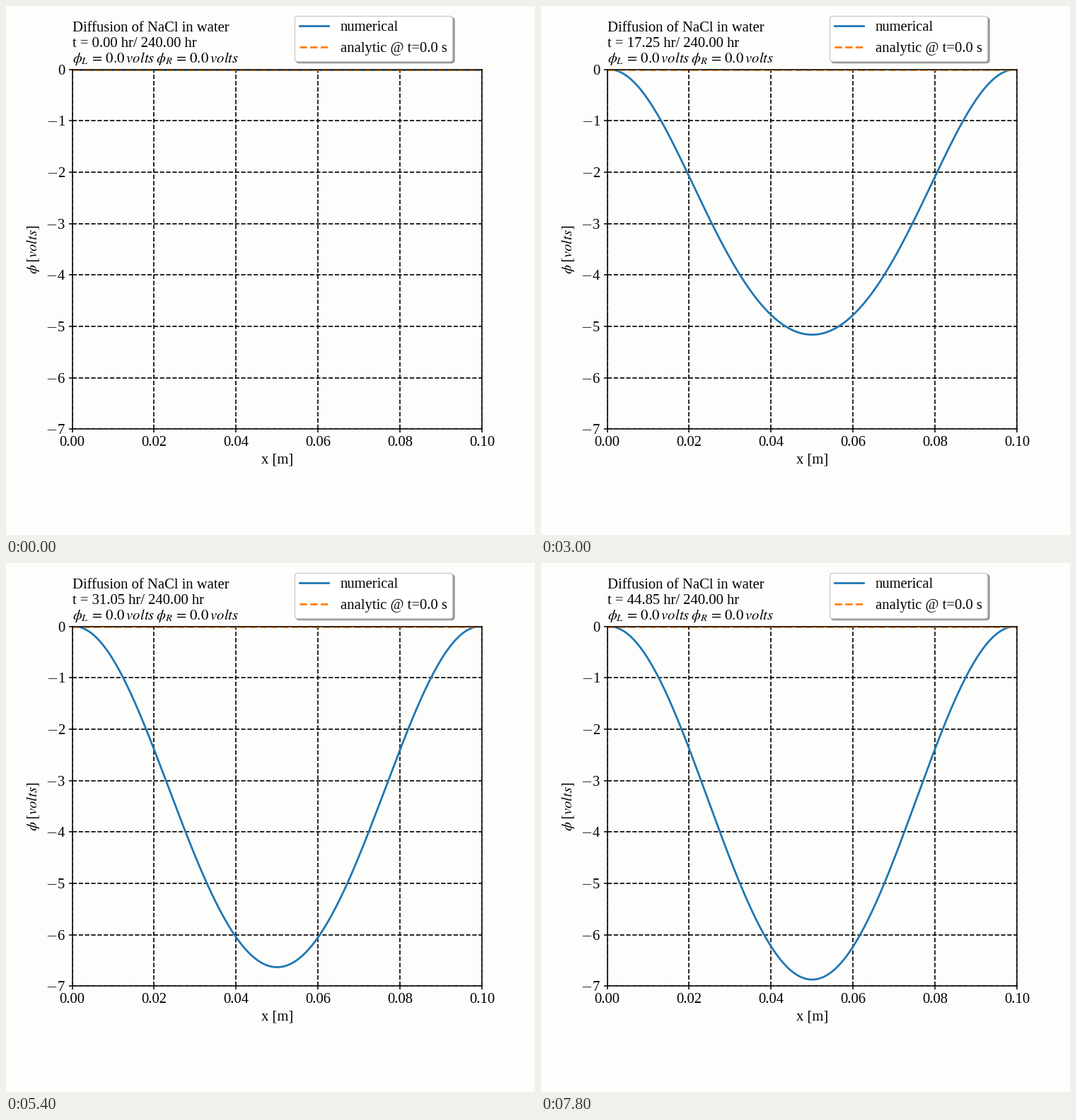
A matplotlib script that plays this animation: 748 by 748 pixels, repeating every 8 s.

```python
import numpy as np
import matplotlib.pyplot as plt
from matplotlib.animation import FuncAnimation

FRAMES, STEP_MS = 40, 200
HOURS_PER_FRAME, TOTAL_HOURS = 1.15, 240
LENGTH, CELL = 0.1, 0.001
D_SLOW, D_FAST = 1.33e-9, 2.03e-9  # ion diffusivities, m^2/s
SCALE = 22.31

plt.rcParams.update({
    "font.family": "Liberation Serif",
    "font.size": 14.9,
    "mathtext.fontset": "stix",
    "axes.linewidth": 1.1,
    "xtick.major.width": 1.1,
    "ytick.major.width": 1.1,
})

x = np.linspace(0, LENGTH, 201)


def potential(hours):
    """Potential from charge separation, summed over cosine modes."""
    span = LENGTH - CELL
    inner = np.clip(x - CELL / 2, 0, span)  # half a cell is flat at each wall
    k = 2 * np.pi * np.arange(1, 40) / span
    decay = k**2 * hours * 3600
    amp = np.exp(-D_SLOW * decay) - np.exp(-D_FAST * decay)
    amp *= (k[0] / k)**4
    return -SCALE * amp @ (1 - np.cos(np.outer(k, inner)))


fig = plt.figure(figsize=(7.48, 7.48), dpi=100, facecolor="#fdfdfc")
ax = fig.add_axes([0.125, 0.2, 0.775, 0.68], facecolor="#fdfdfc")
ax.set(xlim=(0, LENGTH), ylim=(-7, 0), xlabel="x [m]", ylabel=r"$\phi\:[volts]$")
volts = range(-7, 1)
ax.set_yticks(volts, [f"$-${-v}" if v else "0" for v in volts],
              math_fontfamily="cm")
ax.grid(color="k", linestyle="--", linewidth=1.2)

curve, = ax.plot(x, potential(0), color="C0", lw=2, label="numerical")
ax.plot(x, 0 * x, "--", color="C1", lw=2, label="analytic @ t=0.0 s")
ax.legend(loc="upper left", bbox_to_anchor=(407.5 / 748, 1 - 13.5 / 748),
          bbox_transform=fig.transFigure, borderaxespad=0, borderpad=0.36,
          fancybox=True, shadow=True)


def heading(y, text):
    return fig.text(0.125, 1 - y / 748, text, va="baseline")


def side(name):
    gap = r"\hspace{0.16}"
    return rf"\phi_{name}{gap}={gap}0.0\:volts"


heading(36.5, "Diffusion of NaCl in water")
clock = heading(57.5, "")
heading(80, rf"${side('L')}\:{side('R')}$")


def update(i):
    hours = i * HOURS_PER_FRAME
    curve.set_ydata(potential(hours))
    clock.set_text(f"t = {hours:.2f} hr/ {TOTAL_HOURS:.2f} hr")
    return curve, clock


anim = FuncAnimation(fig, update, frames=FRAMES, interval=STEP_MS,
                     repeat=True, repeat_delay=0, blit=False)
plt.show()
```
